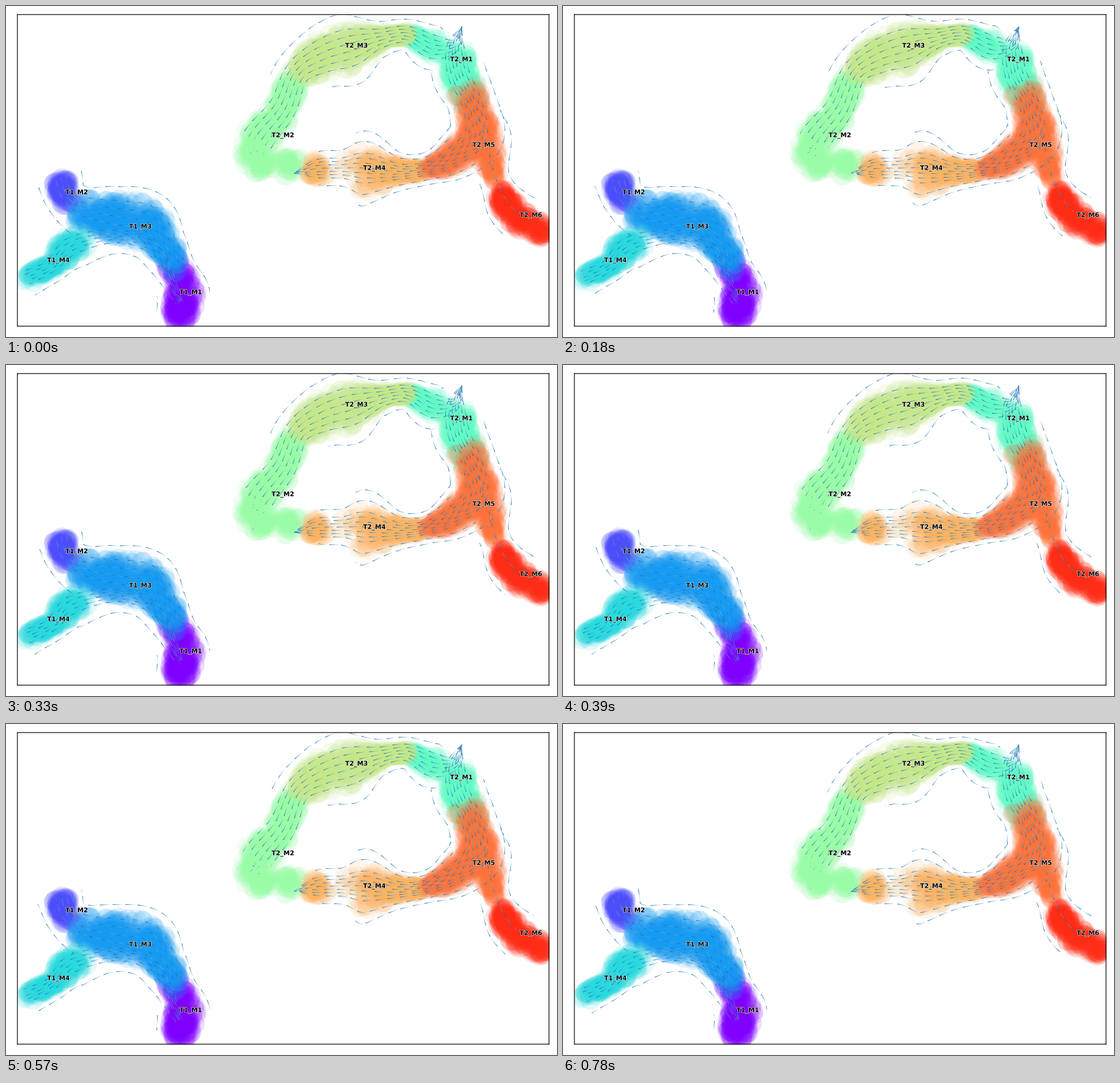
A matplotlib script that plays this animation: 966 by 580 pixels, repeating every 810 ms.

```python
import numpy as np
import matplotlib.pyplot as plt
from matplotlib import patheffects
from matplotlib.animation import FuncAnimation
from matplotlib.collections import LineCollection

W, H, DPI = 966, 580, 100
FRAMES, INTERVAL = 27, 30
STEP = 0.075      # share of one streak travelled per frame
PITCH = 22.0      # distance between streak heads
DOT = 18          # cell radius
ALPHA, COVER = 0.13, 17
LEFT, RIGHT, TOP, BOTTOM = 20, 952, 15, 561

rng = np.random.default_rng(11)
fig = plt.figure(figsize=(W / DPI, H / DPI), dpi=DPI, facecolor="white")
ax = fig.add_axes([LEFT / W, 1 - BOTTOM / H, (RIGHT - LEFT) / W, (BOTTOM - TOP) / H])
ax.set(xlim=(LEFT, RIGHT), ylim=(BOTTOM, TOP), xticks=[], yticks=[])
for spine in ax.spines.values():
    spine.set(linewidth=0.9, zorder=10, snap=False)

# Branches in flow direction: x, y, half width. Cells and streamlines share them.
ARCH = np.array([(799, 36, 0), (788, 68, 16), (750, 72, 34), (703, 50, 24),
                 (655, 57, 28), (605, 72, 54), (555, 88, 48), (510, 118, 36),
                 (484, 180, 40), (438, 242, 46), (455, 284, 36), (502, 276, 36)], float)
FALL = np.array([(799, 36, 0), (788, 72, 34), (794, 120, 42), (816, 168, 38),
                 (824, 225, 43), (785, 264, 36), (740, 284, 25), (690, 290, 30),
                 (630, 284, 58), (590, 284, 40), (545, 285, 35), (505, 293, 0)], float)
TIP = np.array([(824, 195, 40), (838, 240, 45), (856, 302, 25), (880, 350, 35),
                (915, 380, 38), (946, 398, 28)], float)
RISE = np.array([(303, 545, 36), (311, 505, 43), (296, 462, 34), (277, 420, 38),
                 (245, 382, 54), (190, 372, 52), (138, 360, 42), (106, 336, 34),
                 (94, 302, 37)], float)
LOW = np.array([(306, 518, 8), (275, 450, 24), (240, 414, 26), (185, 404, 28),
                (116, 420, 38), (78, 456, 27), (36, 476, 31)], float)


def spot(nodes, u):
    """Catmull-Rom point on a branch; u counts nodes."""
    p = np.vstack([2 * nodes[0] - nodes[1], nodes, 2 * nodes[-1] - nodes[-2]])
    i = np.clip(u.astype(int), 0, len(nodes) - 2)
    f = (u - i)[:, None]
    a, b, c, d = (p[i + k] for k in range(4))
    return b + 0.5 * f * (c - a + f * (2 * a - 5 * b + 4 * c - d
                                       + f * (3 * (b - c) + d - a)))


def arc(p):
    return np.r_[0, np.hypot(*np.diff(p[:, :2], axis=0).T).cumsum()]


def along(p, t):
    """Points at arc lengths t of a polyline."""
    s = arc(p)
    return np.stack([np.interp(t, s, col) for col in p.T], axis=1)


# --- cells -----------------------------------------------------------------
def cells(tone, nodes, start, stop, density=1.0):
    """Scatter translucent discs over part of a branch, thinning to its edge."""
    path = spot(nodes, np.linspace(start, stop, 80))
    length = arc(path)[-1]
    area = (length + 2 * DOT) * 2 * path[:, 2].mean()
    n = int(density * COVER * area / (np.pi * DOT ** 2))
    x, y, w = along(path, rng.uniform(0, length, n)).T
    r = np.maximum(w - DOT, 4) * rng.random(n) ** 0.6
    a = rng.uniform(0, 2 * np.pi, n)
    ax.scatter(x + r * np.cos(a), y + r * np.sin(a), s=(2 * DOT * 72 / DPI) ** 2,
               color=plt.cm.rainbow(tone), alpha=ALPHA, linewidths=0, zorder=1)


cells(0.0, RISE, 0, 1.5)
cells(0.0, RISE, 1.5, 2.5, 0.4)
cells(0.1, RISE, 7.4, 7.7, 1.2)
cells(0.1, RISE, 6.6, 7.4, 0.4)
cells(0.21, RISE, 2.2, 6.1)
cells(0.325, LOW, 4, 6)
cells(0.325, LOW, 3.7, 4.3, 0.4)
cells(0.44, ARCH, 1.8, 3, 0.8)
cells(0.44, FALL, 1.2, 2.6)
cells(0.44, FALL, 2.6, 3.1, 0.5)
cells(0.55, ARCH, 7.2, 10)
cells(0.55, ARCH, 10.7, 11, 0.6)
cells(0.64, ARCH, 3, 6.9)
cells(0.75, FALL, 6.3, 8.1)
cells(0.75, FALL, 9.9, 10.2, 0.8)
cells(0.85, FALL, 2.6, 3.2, 0.45)
cells(0.85, FALL, 3.4, 6)
cells(0.85, TIP, 0, 2, 0.7)
cells(0.945, TIP, 2.5, 5)

# --- streamlines -----------------------------------------------------------
segments, phases = [], []


def stream(path):
    length = arc(path)[-1]
    path = along(path, np.linspace(0, length, max(3, int(length / 1.6))))
    s = arc(path)
    segments.append(np.stack([path[:-1], path[1:]], axis=1))
    phases.append((s[:-1] + s[1:]) / (2 * PITCH) + rng.random())


def flow(nodes, offsets, start=0, stop=None):
    """Streamlines beside a branch, offset in shares of its half width."""
    stop = len(nodes) - 1 if stop is None else stop
    path = spot(nodes, np.linspace(start, stop, 200))
    xy, w = path[:, :2], path[:, 2:]
    t = np.gradient(xy, axis=0)
    normal = np.c_[-t[:, 1], t[:, 0]] / np.hypot(t[:, 0], t[:, 1])[:, None]
    for k in offsets:
        stream(xy + k * w * normal)


flow(ARCH, np.linspace(-0.6, 0.6, 6), 0, 8.9)
flow(ARCH, [1.12], 1.6, 7.3)
flow(ARCH, [-1.2], 1.8, 6.3)
flow(FALL, np.linspace(-0.45, 0.45, 7))
flow(FALL, [-1.15, 1.12], 1.7, 8.4)
flow(FALL, [-0.8, 0.8], 4.6, 10)
flow(TIP, [-0.1], 0, 3.4)
flow(TIP, [-1.1], 0, 3.6)
flow(TIP, [1.1], 2, 3.6)
flow(RISE, np.linspace(-0.2, 0.6, 4), 2.2)
flow(RISE, [1.08], 1)
flow(RISE, [-1.1], 6)
flow(RISE, [-1.1], 0, 1)
flow(LOW, np.linspace(-0.4, 0.4, 5))
flow(LOW, [-1.1])

# near-still specks inside T2_M2
for speck in rng.normal((438, 258), (5, 9), (12, 2)):
    stream(np.array([speck, speck + (-0.8, 1.2)]))

phases = np.concatenate(phases)
streaks = LineCollection(np.concatenate(segments), zorder=3, capstyle="butt")
ax.add_collection(streaks, autolim=False)

# --- labels ----------------------------------------------------------------
LABELS = {"T1_M1": (324, 502), "T1_M2": (124, 327), "T1_M3": (235.5, 387),
          "T1_M4": (92, 446), "T2_M1": (798.5, 94), "T2_M2": (485.5, 227),
          "T2_M3": (614.5, 70), "T2_M4": (646, 284.5), "T2_M5": (837.5, 244),
          "T2_M6": (920.5, 367)}
halo = [patheffects.withStroke(linewidth=0.8, foreground="white")]
for text, (x, y) in LABELS.items():
    ax.text(x, y, text, size=8, weight="bold", family="DejaVu Sans", color="black",
            ha="center", va="center", path_effects=halo, zorder=5)


def draw(i):
    p = (phases - STEP * i) % 1
    streaks.set_linewidth(np.where(p < 0.25, 0, 0.05 + 0.8 * p))
    streaks.set_color(plt.cm.Blues(0.25 + 0.55 * p))
    return [streaks]


anim = FuncAnimation(fig, draw, frames=FRAMES, interval=INTERVAL, repeat=True,
                     repeat_delay=0, blit=False)
plt.show()
```
